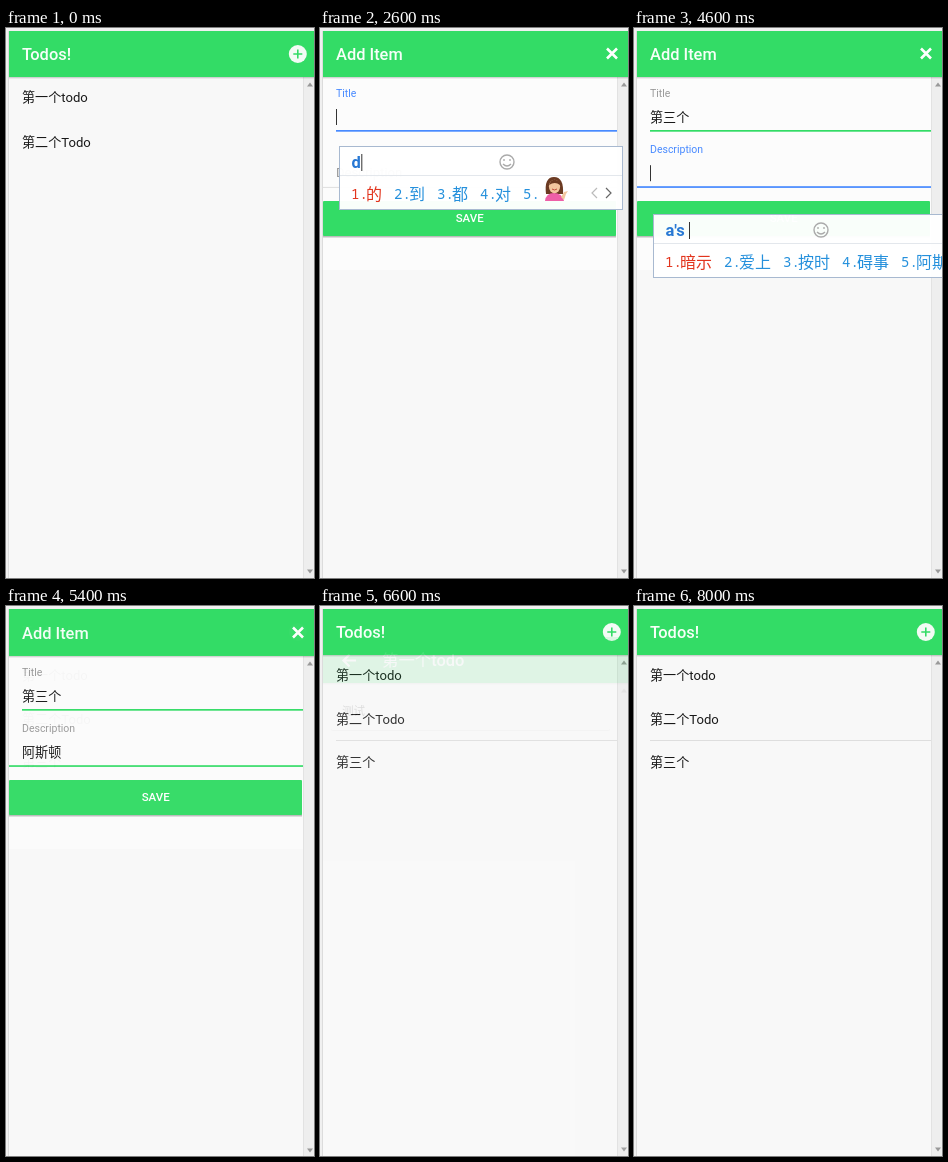
Write an HTML page that moves like this. It is 308x550 px and loops after 8400 ms.

```html
<!DOCTYPE html>
<html lang="zh-CN">
<head>
<meta charset="utf-8">
<title>Todos</title>
<style>
  html, body { margin: 0; width: 100%; height: 100%; overflow: hidden; background: #f0f0f0; }
  svg { display: block; font-family: Roboto, "Noto Sans CJK SC", "Noto Sans CJK", sans-serif; }
  .cand { font-family: "Noto Sans CJK SC", "Noto Sans CJK", sans-serif; }
  .num { font-family: "Noto Sans Mono", monospace; }
</style>
</head>
<body>
<svg id="stage" width="308" height="550" viewBox="0 0 308 550"></svg>
<script>
const LOOP = 8400, STEP = 100;
const GREEN = '#33dc66', BLUE = '#488aff', GREY = '#999', RULE = '#dedede', INK = '#181818';
const stage = document.getElementById('stage');

const rect = (x, y, w, h, fill, extra = '') =>
  `<rect x="${x}" y="${y}" width="${w}" height="${h}" fill="${fill}" ${extra}/>`;
const text = (x, y, size, fill, str, extra = '') =>
  `<text x="${x}" y="${y}" font-size="${size}" fill="${fill}" ${extra}>${str}</text>`;
const path = (d, stroke, width) =>
  `<path d="${d}" fill="none" stroke="${stroke}" stroke-width="${width}"/>`;
const group = (dy, opacity, body) =>
  `<g transform="translate(0 ${dy})" opacity="${opacity}">${body}</g>`;
const clamp = v => Math.max(0, Math.min(1, v));
const mix = (a, b, k) => a + (b - a) * k;

// Latest entry of [[time, value], ...] that has begun.
const latest = (t, entries) => entries.filter(e => t >= e[0]).pop()?.[1];

function page(title, titleX, icon, body) {
  return rect(3, 3, 305, 547, '#f8f8f8') + body +
    rect(297, 49, 11, 501, '#eeeeee') + rect(297, 49, 1, 501, '#e2e2e2') +
    '<path d="M301 58.5l3-4 3 4zM301 541.5l3 4 3-4z" fill="#999"/>' +
    rect(3, 49, 305, 1, '#000', 'opacity=".16"') + rect(3, 50, 305, 1, '#000', 'opacity=".06"') +
    rect(3, 3, 305, 46, GREEN) +
    text(titleX, 32.3, 16.4, '#f6fff8', title, 'font-weight="500"') + icon;
}

function listPage(t) {
  const added = t >= 5300;
  const icon = '<circle cx="291.8" cy="26" r="9" fill="#f3fbf5"/>' +
    path('M287.3 26h9M291.8 21.5v9', GREEN, 1.6);
  const rows = text(16, 74, 13.1, INK, '第一个todo') +
    text(16, added ? 118 : 118.5, 13.1, INK, '第二个Todo') +
    (added ? rect(16, 134, 281, 1, RULE) + text(16, 161, 13.1, INK, '第三个') : '');
  return page('Todos!', 16, icon, rows);
}

// Text field with a label that floats up after focusAt.
function field(t, f) {
  const focused = t >= f.focusAt && t < f.blurAt;
  const k = clamp((t - f.focusAt) / 200), lift = k * (2 - k);
  const color = focused ? BLUE : t >= f.blurAt ? GREEN : RULE;
  const thick = color === RULE ? 1 : 1.7;
  const filled = t >= f.fillAt;
  const x = filled ? 55.5 : 16;
  const caret = focused && f.caret.some(([a, b]) => t >= a && t < b);
  return text(16, mix(f.y, f.y - 23.5, lift), mix(13.1, 10.5, lift), focused ? BLUE : GREY, f.label) +
    rect(f.lineX, f.y + 11.2 - thick, 297 - f.lineX, thick, color) +
    (filled ? text(16, f.y + 1.3, 13.1, INK, f.value) : '') +
    (caret ? rect(x, f.y - 11.5, 1, 16, '#333') : '');
}

const womanEmoji = x => `<g transform="translate(${x} 149)">
  <path d="M2 17Q0 0 10 0T19 17Z" fill="#6b3a22"/>
  <path d="M1 24Q2 16 10 16T20 24Z" fill="#ee5fa7"/>
  <ellipse cx="10.5" cy="9.5" rx="5.6" ry="6.8" fill="#f3c79f"/>
  <path d="M5 8Q7 2 12 3T16 8Q11 4 5 8Z" fill="#6b3a22"/>
  <path d="M8 12q2.5 2 5 0" fill="none" stroke="#c2513d"/>
  <path d="M17 20l3-5 4-1-2 3-2 6z" fill="#f3c79f"/></g>`;

function inputMethod(dy, [typed, candidates]) {
  let x = 31, row = '';
  candidates.split(' ').forEach((word, i) => {
    const color = i ? '#2590dc' : '#e2341d';
    row += text(x, 171, 14, color, `${i + 1}.`, 'class="num"');
    if (word === '*') {
      row += womanEmoji(x + 21);
      x += 57;
    } else {
      row += text(x + 15, 171.5, 16, color, word, 'class="cand"');
      x += 27 + 16 * word.length;
    }
  });
  const caretX = 32 + [...typed].reduce((w, c) => w + (c === 'i' || c === "'" ? 4.4 : 9.3), 0);
  return group(dy, 1,
    rect(19.5, 118.5, x + 23, 63, '#fff', 'fill-opacity=".97" stroke="#a8b9d0"') +
    rect(20, 147, x + 22, 1, '#e3e7ec') +
    text(31.5, 140, 16.5, '#2878d4', typed, 'font-weight="700"') + rect(caretX, 126, 1, 17, '#333') +
    '<circle cx="187" cy="134" r="7" fill="none" stroke="#aaa" stroke-width="1.4"/>' +
    '<path d="M184 131v2M190 131v2M183 136q4 4 8 0" fill="none" stroke="#aaa" stroke-width="1.3"/>' +
    row + path(`M${x + 17} 160l-5 5 5 5`, '#bbb', 1.2) + path(`M${x + 26} 160l5 5-5 5`, '#666', 1.2));
}

const titleField = {
  label: 'Title', value: '第三个', y: 92.5, lineX: 16, focusAt: 1500, blurAt: 4300, fillAt: 3400,
  caret: [[1700, 2200], [2600, 3900]]
};
const descriptionField = {
  label: 'Description', value: '阿斯顿', y: 148.7, lineX: 3, focusAt: 4300, blurAt: 5300, fillAt: 4800,
  caret: [[4400, 5300]]
};
const titleTyping = [
  [2600, ['d', '的 到 都 对 *']],
  [2700, ['di', '第 地 低 底 弟']],
  [2900, ["di's", '第三 第四 但是 都是 电视']],
  [3000, ["di'sa", '第三 第四 迪萨 第 地']],
  [3100, ["di'san", '第三 第 地 低 底']],
  [3300, ["di'san'ge", '第三个 第三 第 地 低']],
  [3400, null]
];
const descriptionTyping = [
  [4500, ['a', '啊 阿 吖 呵 嗄']],
  [4600, ["a's", '暗示 爱上 按时 碍事 阿斯']],
  [4700, ["a's'd", '阿斯顿 暗示 爱上 按时 碍事']],
  [4800, null]
];

function addPage(t) {
  const titleIme = latest(t, titleTyping), descriptionIme = latest(t, descriptionTyping);
  const form = rect(3, 49, 294, 193, '#fcfcfc') + field(t, titleField) + field(t, descriptionField) +
    rect(3, 174, 293, 36, '#000', 'opacity=".12"') + rect(3, 174, 293, 35, '#000', 'opacity=".15"') +
    rect(3, 173, 293, 35, GREEN, 'rx="1"') +
    text(149.7, 194, 11.5, '#fff', 'SAVE', 'font-weight="500" text-anchor="middle"');
  return page('Add Item', 16, path('M287 20.5l10 10M297 20.5l-10 10', '#fff', 2.6), form) +
    (titleIme ? inputMethod(0, titleIme) : '') +
    (descriptionIme ? inputMethod(68, descriptionIme) : '');
}

function detailPage() {
  const card = rect(11, 58, 279, 39, '#000', 'opacity=".14" rx="2"') +
    rect(11, 57, 279, 39, '#fff', 'rx="2"') + text(22, 80.5, 11.5, '#222', '测试');
  return page('第一个todo', 62, path('M36 26.5h-12M29.5 20.5l-6 6 6 6', '#fff', 2.2), card);
}

// Page that rises in at openAt and drops away at closeAt.
function overlay(t, openAt, closeAt, draw) {
  if (t < openAt || t >= closeAt + 200) return '';
  if (t >= closeAt) {
    const p = (t - closeAt + 32) / 200;
    return group(Math.round(40 * p * p), 1 - p * p, draw(t));
  }
  const shown = 1 - (1 - clamp((t - openAt + 30) / 280)) ** 3;
  return group(Math.round(40 * (1 - shown)), shown ** 1.7, draw(t));
}

function scene(t) {
  return rect(0, 0, 308, 550, '#f0f0f0') + rect(2, 3, 1, 547, '#dcdcdc') + listPage(t) +
    overlay(t, 700, 5400, addPage) + overlay(t, 6600, 7800, detailPage);
}

let drawn = -1;
function frame() {
  const t = Math.floor(performance.now() % LOOP / STEP) * STEP;
  if (t !== drawn) stage.innerHTML = scene(drawn = t);
  requestAnimationFrame(frame);
}
frame();
</script>
</body>
</html>
```
